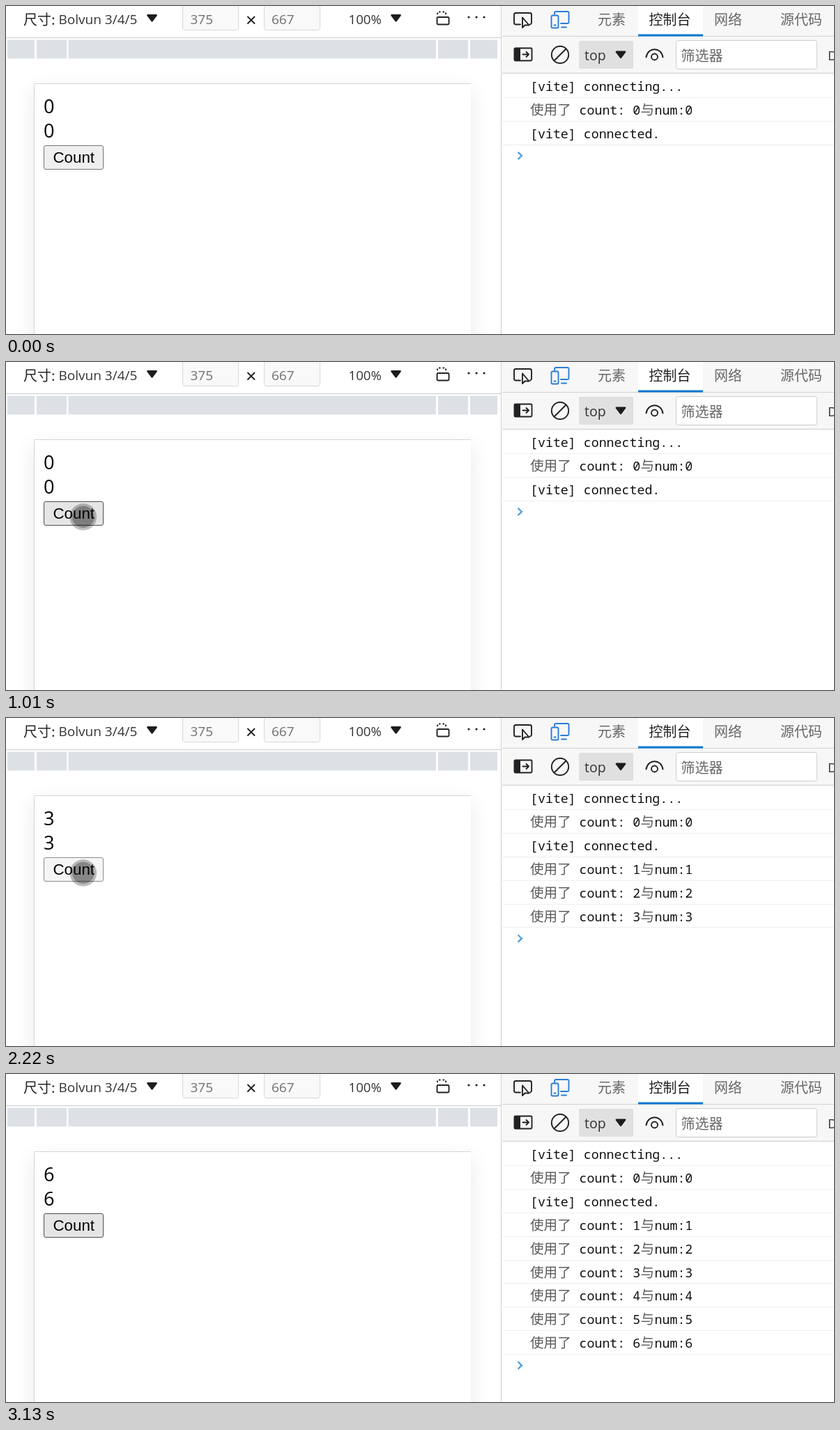
Animation, 1188 px wide and 471 px high, one loop 3740 ms. Source, as an HTML page:

```html
<!DOCTYPE html>
<html lang="zh">
<head>
<meta charset="utf-8">
<title>Counter and console</title>
<style>
  html, body { margin: 0; width: 100%; height: 100%; overflow: hidden; background: #fff; }
  svg { display: block; width: 1188px; height: 471px; }
  text { white-space: pre; }
  .ui { font: 19px "Open Sans", "Noto Sans", sans-serif; fill: #333; }
  .cjk { font: 20px "Noto Sans CJK SC", "Noto Sans CJK", sans-serif; font-weight: 300; fill: #666; }
  .mono { font: 18.27px "Noto Sans Mono", "DejaVu Sans Mono", monospace; fill: #111; }
  .log { font: 19.6px "Noto Sans CJK SC", "Noto Sans CJK", sans-serif; font-weight: 300; fill: #5a5a5a; }
  .num { font: 27px "Open Sans", "Noto Sans", sans-serif; fill: #000; }
  .btn { font: 22.3px "Liberation Sans", Arial, sans-serif; fill: #000; }
  .dim { fill: #707070; }
  .dark { fill: #222; }
  .icon { fill: none; stroke: #222; stroke-width: 1.9; stroke-linejoin: round; stroke-linecap: round; }
  .blue { stroke: #2b7cd9; }
</style>
</head>
<body>
<svg viewBox="0 0 1188 471">
  <defs>
    <filter id="blur" x="-20%" y="-20%" width="140%" height="140%"><feGaussianBlur stdDeviation="15"/></filter>
    <clipPath id="left"><rect y="76" width="710" height="395"/></clipPath>
    <path id="caret" d="M1 0H14Q15.5 .5 14.6 2L8.6 10Q7.5 11.3 6.4 10L.4 2Q-.5 .5 1 0Z" fill="#1c1c1c"/>
  </defs>
  <rect width="1188" height="471" fill="#fff"/>

  <!-- device bar -->
  <text class="cjk dark" x="25" y="26.5">尺寸:</text>
  <text class="ui" x="75.5" y="25.7">Bolvun 3/4/5</text>
  <use href="#caret" x="202" y="12"/>
  <g fill="#f9f9f9" stroke="#d8d8d8">
    <rect x="253.5" y="-5.5" width="80" height="40" rx="3"/>
    <rect x="370.5" y="-5.5" width="80" height="40" rx="3"/>
  </g>
  <text class="ui dim" x="264.5" y="25.7">375</text>
  <text class="ui dim" x="381" y="25.7">667</text>
  <path class="icon" d="M347 15.5l9.5 9.5M356.5 15.5l-9.5 9.5"/>
  <text class="ui" x="491.5" y="25.7" style="font-size:18.6px">100%</text>
  <use href="#caret" x="552" y="12"/>
  <rect class="icon" x="618.5" y="16" width="17" height="10.5" rx="1.5"/>
  <path class="icon" d="M619 12V8.5H631V12" stroke-dasharray="2.5 3" style="stroke-linecap:butt"/>
  <g fill="#222"><circle cx="664" cy="16" r="1.6"/><circle cx="675" cy="16" r="1.6"/><circle cx="686" cy="16" r="1.6"/></g>
  <rect y="45" width="710" height="1" fill="#cbcbcb"/>
  <path d="M2 48.5H41V75.5H2ZM44 48.5H87V75.5H44ZM89.5 48.5H617V75.5H89.5ZM620 48.5H663V75.5H620ZM666 48.5H705V75.5H666Z" fill="#dde1e6"/>

  <!-- page -->
  <g clip-path="url(#left)">
    <rect x="40" y="120" width="627" height="500" fill="#000" opacity=".085" filter="url(#blur)"/>
    <rect x="40" y="111" width="627" height="500" fill="#fff"/>
    <path d="M667 111.5H40.5V471" fill="none" stroke="#d6d6d6"/>
  </g>
  <text class="num" x="54" y="154" id="count"></text>
  <text class="num" x="54" y="189" id="num"></text>
  <rect id="button" x="54.5" y="200.5" width="85" height="34" rx="2.5"/>
  <text class="btn" x="67.5" y="224.5">Count</text>
  <g id="cursor"><circle r="19.3"/><circle r="15.7"/></g>

  <!-- tool tabs -->
  <rect x="710" width="1" height="471" fill="#cbcbcb"/>
  <rect x="712" width="476" height="96" fill="#f7f7f7"/>
  <rect x="712" y="43" width="476" height="1" fill="#d2d2d2"/>
  <rect x="907" width="93" height="43" fill="#fff"/>
  <rect x="907" y="40.5" width="93" height="3" fill="#0f78d4"/>
  <path class="icon" d="M738 26.5H731.5Q729 26.5 729 24V12.5Q729 10 731.5 10H751.5Q754 10 754 12.5V24Q754 26 752 26.5"/>
  <path class="icon" d="M741 16.5V31L744.5 27.5H750.5Z" fill="#f7f7f7"/>
  <g class="icon blue">
    <path d="M787 12V10Q787 8 789 8H805.5Q807.5 8 807.5 10V23Q807.5 25 805.5 25H796M797 30.5H804"/>
    <rect x="782.5" y="13.5" width="10" height="18" rx="2"/>
    <path d="M786.5 27.5H788.5"/>
  </g>
  <text class="cjk" x="849" y="26.5">元素</text>
  <text class="cjk dark" x="922.5" y="26.5">控制台</text>
  <text class="cjk" x="1016" y="26.5">网络</text>
  <text class="cjk" x="1111" y="26.5">源代码</text>

  <!-- console toolbar -->
  <rect class="icon" x="729.5" y="60.5" width="25" height="18" rx="1.5"/>
  <rect x="729" y="60" width="9" height="19" fill="#222"/>
  <path class="icon" d="M741.5 69.5H750M746.5 66L750 69.5L746.5 73"/>
  <circle class="icon" cx="795" cy="70" r="12.2"/>
  <path class="icon" d="M803.5 61.5L786.5 78.5"/>
  <rect x="822" y="50" width="78" height="40" rx="2" fill="#e0e0e0"/>
  <text class="ui" x="830" y="78" style="font-size:19.5px">top</text>
  <use href="#caret" x="874.5" y="64.5"/>
  <path class="icon" d="M918.5 73.5C921 58.5 940 58.5 942.5 73.5"/>
  <circle class="icon" cx="930.5" cy="73" r="4.5"/>
  <rect x="961.5" y="49.5" width="202" height="41" rx="3" fill="#fff" stroke="#cfcfcf"/>
  <text class="cjk" x="968.5" y="79">筛选器</text>
  <text class="ui" x="1179" y="78">D</text>
  <rect x="712" y="96" width="476" height="1" fill="#cbcbcb"/>

  <g id="console"></g>
  <path id="prompt" d="M734.5 -5.2L740 0L734.5 5.2" fill="none" stroke="#4fa0de" stroke-width="2.3"/>
</svg>
<script>
const LOOP = 3740, ROW = 33.9, MAX_COUNT = 6;
const $ = id => document.getElementById(id);

const BUTTON = {
  idle: ['#efefef', '#767676'],
  hover: ['#e5e5e5', '#4f4f4f'],
  active: ['#f5f5f5', '#8d8d8d']
};
// outer and inner disc
const CURSOR = {
  gray: ['rgba(0,0,0,.25)', 'rgba(0,0,0,.27)'],
  yellow: ['rgba(218,215,40,.84)', 'rgba(172,165,25,.6)']
};

// time, count, button look, cursor look
const steps = [
  [0, 0, 'idle', null],
  [200, 0, 'idle', 'gray'],
  [810, 0, 'hover', 'gray'],
  [1110, 0, 'hover', 'yellow'],
  [1210, 1, 'active', 'gray'],
  [1310, 1, 'hover', 'gray'],
  [1710, 1, 'hover', 'yellow'],
  [1820, 2, 'active', 'gray'],
  [2020, 2, 'hover', 'gray'],
  [2120, 2, 'hover', 'yellow'],
  [2220, 3, 'active', 'gray'],
  [2420, 3, 'hover', 'gray'],
  [2520, 3, 'hover', 'yellow'],
  [2620, 4, 'active', 'gray'],
  [2720, 4, 'hover', 'yellow'],
  [2820, 5, 'active', 'gray'],
  [2920, 5, 'hover', 'yellow'],
  [3020, 6, 'active', 'gray'],
  [3130, 6, 'hover', null]
];

function cursorAt(t) {
  if (t >= 910) return [110.8, 222.5];
  if (t >= 810) return [115, 225];
  const k = Math.min(5, Math.max(0, Math.floor((t - 200) / 102)));
  const rest = (1 - k / 5) ** 2;
  return [124 + 106 * rest, 229 + 187 * rest];
}

function add(parent, tag, attrs, text = '') {
  const el = document.createElementNS('http://www.w3.org/2000/svg', tag);
  for (const key in attrs) el.setAttribute(key, attrs[key]);
  el.textContent = text;
  parent.append(el);
  return el;
}

const messages = ['[vite] connecting...', 0, '[vite] connected.'];
for (let n = 1; n <= MAX_COUNT; n++) messages.push(n);

const rows = messages.map((msg, i) => {
  const row = add($('console'), 'g', {});
  const y = Math.round(122 + i * ROW);
  const put = (cls, x, text) => add(row, 'text', { class: cls, x, y }, text);
  if (typeof msg === 'string') {
    put('mono', 752, msg);
  } else {
    put('log', 752, '使用了');
    put('mono', 822.5, `count: ${msg}`);
    put('log', 910.5, '与');
    put('mono', 930.5, `num:${msg}`);
  }
  add(row, 'rect', { x: 712, y: Math.floor(131.4 + i * ROW), width: 476, height: 1, fill: '#efefef' });
  return row;
});

function render(t) {
  const [, count, look, pointer] = steps.findLast(step => step[0] <= t);
  $('count').textContent = $('num').textContent = count;

  const [fill, stroke] = BUTTON[look];
  $('button').setAttribute('fill', fill);
  $('button').setAttribute('stroke', stroke);

  const cursor = $('cursor');
  cursor.setAttribute('visibility', pointer ? 'visible' : 'hidden');
  if (pointer) {
    cursor.setAttribute('transform', `translate(${cursorAt(t)})`);
    CURSOR[pointer].forEach((color, i) => cursor.children[i].setAttribute('fill', color));
  }

  rows.forEach((row, i) => row.setAttribute('visibility', i < count + 3 ? 'visible' : 'hidden'));
  $('prompt').setAttribute('transform', `translate(0 ${215 + count * ROW})`);
}

const start = performance.now();
function tick() {
  render((performance.now() - start) % LOOP);
  requestAnimationFrame(tick);
}
tick();
</script>
</body>
</html>
```
